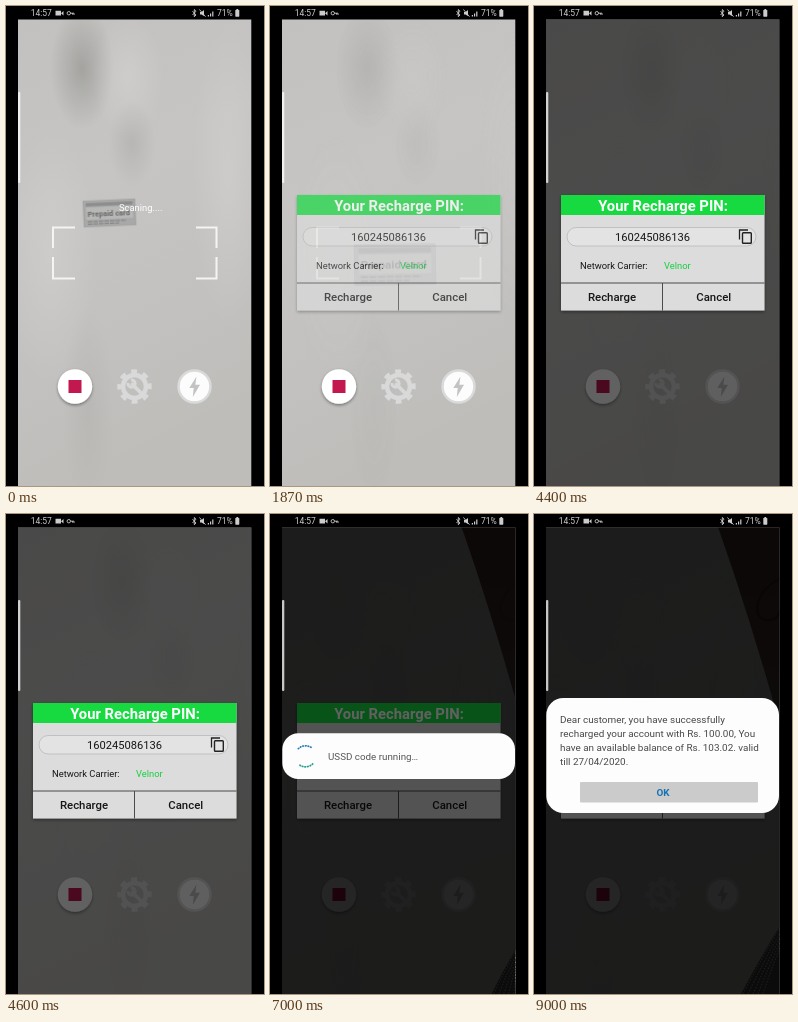
An HTML page that plays this animation: 258x480 px, repeating every 9.07 s.

```html
<!DOCTYPE html>
<html lang="en">
<head>
<meta charset="utf-8">
<title>Recharge card scan</title>
<style>
  html, body { margin: 0; width: 100%; height: 100%; overflow: hidden; background: #000; }
  svg { display: block; width: 100vw; height: 100vh; font-family: Roboto, "Noto Sans", sans-serif; }
  .mid { text-anchor: middle; }
  .med { font-weight: 500; }
  .line { fill: none; }
</style>
</head>
<body>
<svg viewBox="0 0 258 480">
  <defs>
    <clipPath id="screen"><rect x="12" y="13.500" width="233.300" height="467"/></clipPath>
    <linearGradient id="paper" x1="0" y1="0" x2=".25" y2="1">
      <stop offset="0" stop-color="#c2c1bf"/>
      <stop offset=".4" stop-color="#c6c5c4"/>
      <stop offset=".75" stop-color="#c2c1bf"/>
      <stop offset="1" stop-color="#bebdba"/>
    </linearGradient>
    <radialGradient id="shade">
      <stop offset="0" stop-color="#74746f" stop-opacity=".4"/>
      <stop offset="1" stop-color="#74746f" stop-opacity="0"/>
    </radialGradient>
    <radialGradient id="glow">
      <stop offset="0" stop-color="#dededc" stop-opacity=".5"/>
      <stop offset="1" stop-color="#dededc" stop-opacity="0"/>
    </radialGradient>
    <linearGradient id="red" x1="0" y1="0" x2="0" y2="1">
      <stop offset="0" stop-color="#563434"/>
      <stop offset="1" stop-color="#5c4a48"/>
    </linearGradient>
    <filter id="soft" x="-30%" y="-30%" width="160%" height="160%">
      <feDropShadow dx="0" dy="1.500" stdDeviation="1.500" flood-opacity=".4"/>
    </filter>
    <filter id="blur"><feGaussianBlur stdDeviation=".45"/></filter>
  </defs>
  <rect width="258" height="480"/>

  <g clip-path="url(#screen)">
    <rect x="12" y="13" width="234" height="467" fill="url(#paper)"/>
    <g id="folds">
      <ellipse cx="76" cy="62" rx="32" ry="62" fill="url(#shade)"/>
      <ellipse cx="122" cy="70" rx="36" ry="62" fill="url(#glow)" opacity=".7"/>
      <ellipse cx="126" cy="138" rx="24" ry="44" fill="url(#shade)" opacity=".45"/>
      <ellipse cx="222" cy="170" rx="36" ry="150" fill="url(#glow)" opacity=".6"/>
      <ellipse cx="45" cy="250" rx="45" ry="130" fill="url(#glow)" opacity=".6"/>
      <ellipse cx="82" cy="400" rx="26" ry="100" fill="url(#shade)" opacity=".25"/>
    </g>
    <g id="card" filter="url(#blur)">
      <rect x="-40" y="-20" width="80" height="40" fill="#a7a8a7" stroke="#999" stroke-width=".8"/>
      <rect x="-36" y="-10" width="72" height="19" fill="#b7b7b6"/>
      <rect x="-36" y="-16.500" width="72" height="5" fill="#8c8d8d"/>
      <text x="-34" y="4" font-size="11.500" font-weight="700" fill="#676868">Prepaid card</text>
      <path class="line" d="M-34 12H26M-34 16H14" stroke="#888" stroke-width="2" stroke-dasharray="7 1.500"/>
    </g>
    <path id="floor" fill="url(#red)"/>
    <path id="cable" class="line" stroke="#33211f" stroke-width="2" d="M248 64C222 74 216 104 232 106S246 92 250 84"/>
    <path id="rug" fill="#55504e"/>
    <path id="weave" class="line" stroke="#b4aeab" stroke-width="1.200" stroke-dasharray="1.500 1.500"/>

    <g id="scan">
      <path class="line" stroke="#f4f4f4" stroke-width="2"
        d="M47 242V221.500H69M190 221.500H210.500V242M47 251V272.500H69M190 272.500H210.500V251"/>
      <text id="hint" x="113" y="205.300" font-size="9.400" fill="#fff">Scaning....</text>
    </g>
    <circle cx="69" cy="380.500" r="17.200" fill="#fff" filter="url(#soft)"/>
    <rect x="62.500" y="374" width="13" height="13" fill="#c3174f"/>
    <g transform="translate(128.500 380.500) scale(-1 1)">
      <circle r="14.700" class="line" stroke="#d9d9d9" stroke-width="5" stroke-dasharray="5.770" stroke-dashoffset="2.885"/>
      <circle r="11.500" class="line" stroke="#d9d9d9" stroke-width="4.500"/>
      <path class="line" d="M-6 6L2 -2" stroke="#d9d9d9" stroke-width="3.800" stroke-linecap="round"/>
      <path class="line" d="M3.500 -6.500A3.600 3.600 0 1 0 6.500 -3.500" stroke="#d9d9d9" stroke-width="3"/>
    </g>
    <circle cx="188.500" cy="380.500" r="16" fill="#fcfcfc" stroke="#dadada" stroke-width="2.500"/>
    <path d="M190.500 370.500L183.300 382H187.700L186.800 391L194 378.700H189.300Z" fill="#c3c3c3"/>

    <rect id="dim1" x="12" y="13" width="234" height="467"/>
    <g id="pin">
      <rect x="27" y="189" width="203.500" height="115.500" fill="#dcdcdc" filter="url(#soft)"/>
      <rect x="27" y="189" width="203.500" height="20" fill="#16da40"/>
      <text class="mid" x="129" y="205" font-size="14.800" font-weight="700" fill="#fff">Your Recharge PIN:</text>
      <rect x="33" y="221.500" width="189" height="18.500" rx="9.250" fill="#e3e3e3" stroke="#b9b9b9" stroke-width=".8"/>
      <text class="mid" x="118.500" y="235" font-size="11.150" fill="#161616">160245086136</text>
      <path class="line" d="M205.500 233.500V224H214" stroke="#222" stroke-width="1.300"/>
      <rect class="line" x="208.500" y="226.700" width="8.800" height="10.500" rx=".8" stroke="#222" stroke-width="1.400"/>
      <text x="46" y="263" font-size="9.400" fill="#161616">Network Carrier:</text>
      <text x="130" y="263" font-size="9.400" fill="#16cf42">Velnor</text>
      <path class="line" d="M27 277H230.500M128.500 277V304.500" stroke="#4b4b4b"/>
      <text class="mid med" x="78" y="295" font-size="11.400" fill="#161616">Recharge</text>
      <text class="mid med" x="179.700" y="295" font-size="11.400" fill="#161616">Cancel</text>
    </g>

    <rect id="dim2" x="12" y="13" width="234" height="467"/>
    <g id="ussd">
      <rect x="12.300" y="219.300" width="232.700" height="45.700" rx="16" fill="#fdfdfd"/>
      <g id="spin" class="line" stroke-width="1.700" stroke-linecap="round" stroke-dasharray=".6 2">
        <path d="M-8.600 -6A10.500 10.500 0 0 1 3.600 -9.900" stroke="#25a08e"/>
        <path d="M8.600 6A10.500 10.500 0 0 1 -3.600 9.900" stroke="#1f7fbc"/>
      </g>
      <text x="58" y="246" font-size="9.800" fill="#565656">USSD code running…</text>
    </g>
    <g id="result">
      <rect x="12.300" y="184" width="232.700" height="115" rx="17" fill="#fdfdfd"/>
      <g font-size="9.920" fill="#484848">
        <text x="26" y="208.700">Dear customer, you have successfully</text>
        <text x="26" y="222.800">recharged your account with Rs. 100.00, You</text>
        <text x="26" y="236.900">have an available balance of Rs. 103.02. valid</text>
        <text x="26" y="251">till 27/04/2020.</text>
      </g>
      <rect id="press" x="46" y="268" width="178" height="20.500" rx="1" fill="#cbcbcb"/>
      <text class="mid" x="129" y="282" font-size="9.900" font-weight="700" fill="#1672b3">OK</text>
    </g>
  </g>

  <rect x="12" y="86" width="2.300" height="91" rx="1" fill="#fff" opacity=".75"/>

  <g fill="#ccc" font-size="8.500">
    <text x="24.700" y="10.400">14:57</text>
    <text x="211" y="10.400">71%</text>
    <path d="M49.500 4.800H55V9.600H49.500ZM55 7.200L57.500 5V9.400Z"/>
    <rect x="229.300" y="4" width="4" height="6.700" rx=".6"/>
    <rect x="230.400" y="3" width="1.800" height="1.200"/>
    <path d="M201.800 10.500H203V9H201.800ZM204 10.500H205.200V7.500H204ZM206.200 10.500H207.400V5.500H206.200Z"/>
    <path d="M194 6H195.500L198 4V10L195.500 8.500H194Z"/>
    <g class="line" stroke="#ccc" stroke-width=".9">
      <circle cx="62.800" cy="7.200" r="1.700"/>
      <path d="M64.500 7.200H68V9M66.500 7.200V8.600"/>
      <path d="M186.500 5.200L190 9L188.300 10.700V3.500L190 5.200L186.500 9M193.500 3.500L199.500 10.700"/>
    </g>
  </g>
</svg>
<script>
  const LOOP = 9070, STEP = 1000 / 15;
  const $ = id => document.getElementById(id);

  // Linear interpolation through [time, value] pairs.
  function track(t, keys) {
    if (t <= keys[0][0]) return keys[0][1];
    for (let i = 1; i < keys.length; i++) {
      const [a, from] = keys[i - 1], [b, to] = keys[i];
      if (t < b) return from + (to - from) * (t - a) / (b - a);
    }
    return keys[keys.length - 1][1];
  }
  const fade = (id, value) => $(id).setAttribute("opacity", value);
  const move = (id, value) => $(id).setAttribute("transform", value);
  const ease = p => p * p * (3 - 2 * p);

  function camera(t) {
    const p = ease(track(t, [[0, 0], [930, 1]]));
    const sway = Math.sin(t / 150) * track(t, [[930, 0], [1100, .6], [1800, 0]]);
    move("folds", `translate(${track(t, [[0, 0], [930, 10], [2600, 30], [4500, 42], [7600, -20]])} ${
      track(t, [[0, 0], [930, 14], [2600, -10], [4500, 5], [7600, 30]])})`);
    fade("folds", track(t, [[0, 1], [930, .5], [5000, .3], [7600, .15]]));
    move("card", `translate(${103.5 + 21.5 * p + sway} ${207 + 51.5 * p - sway}) rotate(${
      -2.5 + 1.5 * p}) scale(${.65 + .36 * p})`);
    fade("card", track(t, [[1900, 1], [2100, 0]]));

    // The sheet's right edge keeps its slope while it slides in.
    const x = track(t, [[4700, 248], [5467, 217], [6600, 196], [7667, 184]]);
    const y = 14 + (246 - x) * 3.18;
    $("floor").setAttribute("d", `M${x} 13Q${x + (246 - x) * .53} ${14 + (y - 14) * .47} 246 ${y}V13Z`);
    move("cable", `translate(${x - 184} 0)`);
    fade("cable", track(t, [[6600, 0], [7667, 1]]));
    const rx = track(t, [[4700, 250], [5467, 235], [7667, 216], [9000, 207]]);
    const ry = track(t, [[4700, 484], [5467, 450], [7667, 429], [9000, 412]]);
    const arc = k => `M${rx + k} 480Q${(rx + k + 246) / 2} ${(ry + k + 480) / 2 - 3} 246 ${ry + k}`;
    $("rug").setAttribute("d", arc(0) + "V480Z");
    $("weave").setAttribute("d", t < 4700 ? "" : [2, 7, 12, 17, 22].map(arc).join(""));
  }

  function draw(t) {
    camera(t);
    fade("hint", t < 1860 ? 1 : 0);
    fade("dim1", track(t, [[1867, 0], [2067, .62]]));
    fade("pin", t < 1860 ? 0 : track(t, [[1866, .7], [2000, 1]]));

    fade("dim2", track(t, [[4800, 0], [5000, .62], [7400, .62], [7600, 0], [7667, 0], [7867, .62]]));
    fade("ussd", track(t, [[4800, 0], [5000, 1], [7400, 1], [7533, 0]]));
    move("spin", `translate(35.500 242.300) rotate(${(t - 5467) * .36})`);

    fade("result", track(t, [[7580, 0], [7660, .94], [7734, 1]]));
    const rise = track(t, [[7600, 1], [7667, .75], [7734, .35], [7800, .1], [7867, 0]]);
    move("result", `translate(0 ${10 * rise})`);
    fade("press", track(t, [[8800, 0], [8934, 1]]));
  }

  const start = performance.now();
  function tick() {
    const t = (performance.now() - start) % LOOP;
    draw(Math.floor((t + 4) / STEP) * STEP);
    requestAnimationFrame(tick);
  }
  tick();
</script>
</body>
</html>
```
